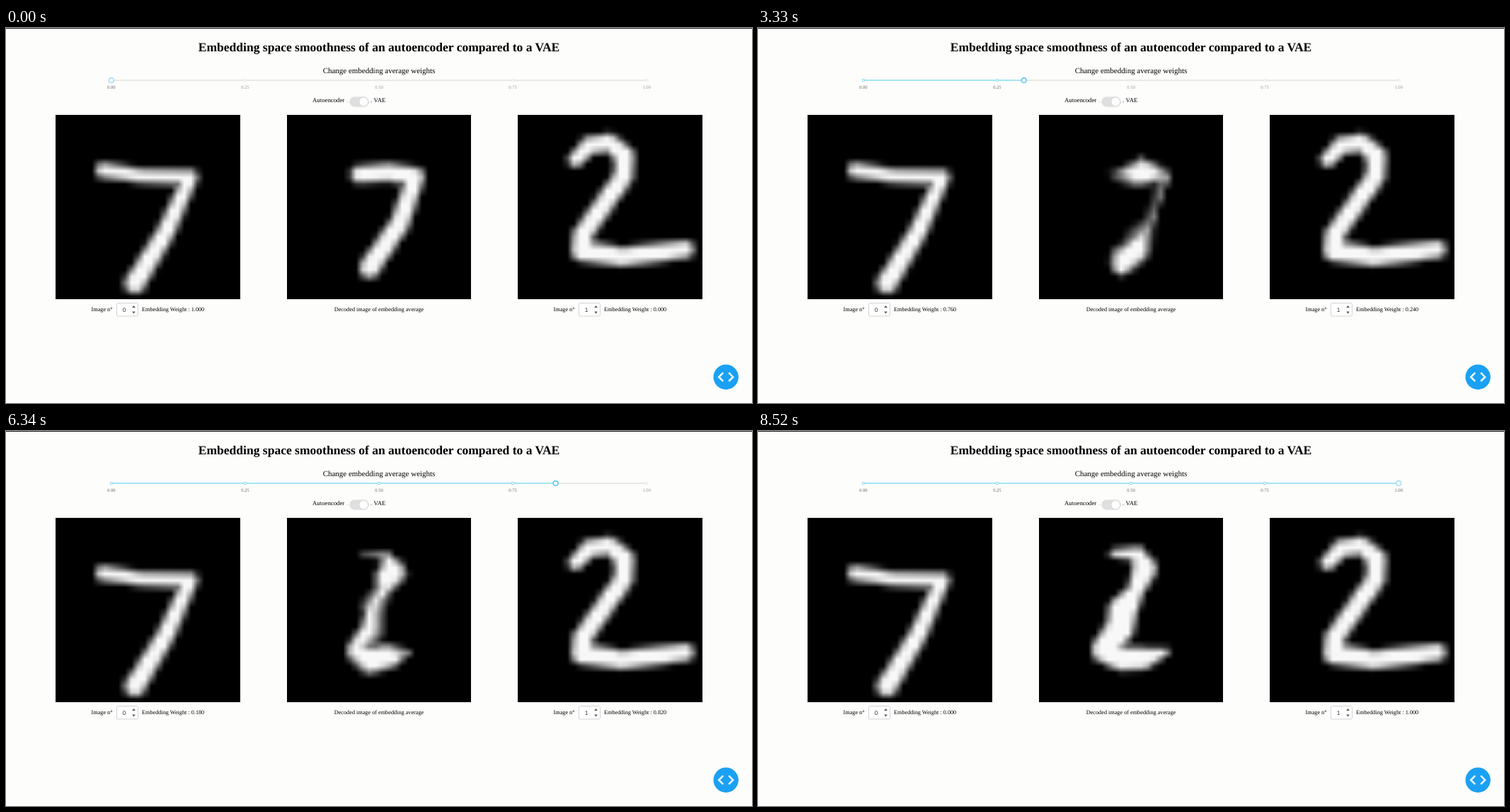
These frames come from a looping animation (1054 by 531 pixels, 8610 ms). An HTML page with a canvas:

```html
<!DOCTYPE html>
<html lang="en">
<head>
<meta charset="utf-8">
<title>Embedding space smoothness</title>
<style>
html, body { margin: 0; width: 100%; height: 100%; overflow: hidden; background: #fdfdfc; }
svg { position: absolute; left: 0; top: 0; }
canvas { position: absolute; top: 123px; height: 261px; background: #000; }
text { font-family: "Liberation Serif", "Times New Roman", serif; font-size: 8.22px; fill: #000; text-rendering: geometricPrecision; }
.mid { text-anchor: middle; }
.num { font: 8.4px "Liberation Sans", Arial, sans-serif; fill: #333; }
.mark { font-size: 6.6px; text-anchor: middle; }
.big { font-size: 8.77px; }
</style>
</head>
<body>
<svg width="1054" height="531" viewBox="0 0 1054 531">
  <rect width="1054" height="1" fill="#222"/>
  <text class="mid" x="527" y="32.8" style="font-size:17.55px;font-weight:bold">Embedding space smoothness of an autoencoder compared to a VAE</text>
  <text class="mid" x="527" y="64.4" style="font-size:10.98px">Change embedding average weights</text>

  <rect x="148.8" y="72.9" width="756.4" height="2.2" rx="1.1" fill="#e9e9e4"/>
  <rect id="track" x="148.8" y="72.9" height="2.2" rx="1.1" fill="#a4e5f4"/>
  <g id="marks"></g>
  <circle id="handle" cy="74" r="3.4" fill="#fff"/>

  <text class="big" x="433" y="104.8">Autoencoder</text>
  <text class="big" x="519.5" y="104.8">VAE</text>
  <circle cx="482.5" cy="104.5" r="1" fill="#e2e2e2"/>
  <circle cx="516" cy="104.5" r="1.2" fill="#b4dcf2"/>
  <rect x="485.3" y="97.3" width="27.6" height="14.4" rx="7.2" fill="#dfdfdf"/>
  <circle cx="505.3" cy="104.5" r="6.4" fill="#fff" stroke="#cfcfcf" stroke-width=".7"/>

  <g id="left"></g>
  <g id="right"></g>
  <text class="mid" x="527" y="400.6">Decoded image of embedding average</text>

  <circle cx="1017.2" cy="494.2" r="17.7" fill="#1aa1f3"/>
  <path d="M1013.2 488.2l-6 6 6 6M1021.2 488.2l6 6-6 6" fill="none" stroke="#fff" stroke-width="2.4"/>
</svg>
<script>
const LOOP = 8610, N = 28, SIZE = 261, SOFT = 11;
const X0 = 148.8, SPAN = 756.4;
const $ = id => document.getElementById(id);

// Each stroke is a chain of [x, y, radius] in panel pixels.
const seven = [[67, 78, 10], [120, 86, 9], [190, 88, 10], [156, 165, 12], [112, 238, 14]];
const two = [[82, 63, 10], [101, 43, 12], [129, 39, 12], [151, 58, 13], [149, 87, 13],
  [91, 170, 13], [90, 192, 14], [147, 201, 13], [236, 190, 12]];

// The decoder's own versions; everything between them is a blend.
const softSeven = [[102, 84, 11], [143, 81, 12], [182, 87, 12], [160, 153, 13], [117, 216, 14]];
const softTwo = [[106, 50, 5], [140, 50, 9], [149, 72, 17], [138, 102, 11], [119, 130, 20],
  [115, 155, 19], [93, 186, 18], [115, 199, 16], [147, 199, 15], [178, 190, 5]];

// Slider position over time.
const drag = [[1630, 0], [2280, .1], [3330, .3], [4630, .53], [5590, .68], [7090, .98], [7460, 1]];

function position(t) {
  const i = drag.findIndex(p => p[0] >= t);
  if (i < 0) return 1;
  if (!i) return 0;
  const [a, u] = drag[i - 1], [b, v] = drag[i];
  return u + (v - u) * (t - a) / (b - a);
}

const step = v => Math.round(v * 100) / 100;

// The decoder trails the slider, most of all around a third of the way.
function weight(t) {
  const p = position(t - 50);
  return step(Math.max(0, p - .05 * Math.exp(-(((p - .3) / .25) ** 2))));
}

// How deep a point lies inside a tapered segment.
function depth(x, y, [ax, ay, ar], [bx, by, br]) {
  const dx = bx - ax, dy = by - ay;
  const k = Math.max(0, Math.min(1, ((x - ax) * dx + (y - ay) * dy) / (dx * dx + dy * dy)));
  return ar + (br - ar) * k - Math.hypot(x - ax - dx * k, y - ay - dy * k);
}

function field(stroke) {
  const cell = SIZE / N;
  return Float32Array.from({ length: N * N }, (_, i) => {
    const x = (i % N + .5) * cell, y = (Math.floor(i / N) + .5) * cell;
    return Math.max(...stroke.slice(1).map((p, j) => depth(x, y, stroke[j], p)));
  });
}

function panel(left, width) {
  const c = document.createElement('canvas');
  c.width = c.height = N;
  c.style.left = left + 'px';
  c.style.width = width + 'px';
  document.body.append(c);
  return c.getContext('2d');
}

function paint(ctx, f, g = f, k = 0) {
  const img = ctx.createImageData(N, N);
  for (let i = 0; i < N * N; i++) {
    const d = f[i] + (g[i] - f[i]) * k;
    const v = 248 * Math.max(0, Math.min(1, .5 + d / SOFT));
    img.data.set([v, v, v, 255], i * 4);
  }
  ctx.putImageData(img, 0, 0);
}

function caption(id, x, n) {
  $(id).innerHTML = `<text x="${x + .5}" y="401">Image n°</text>
    <rect x="${x + 36.4}" y="389.6" width="30" height="18.4" rx="2" fill="#fff" stroke="#ccc" stroke-width=".9"/>
    <text class="num mid" x="${x + 47.2}" y="402">${n}</text>
    <path d="M${x + 58.2} 396h4.6l-2.3-3zM${x + 58.2} 401.6h4.6l-2.3 3z" fill="#555"/>
    <text x="${x + 72}" y="401">Embedding Weight : <tspan></tspan></text>`;
  return $(id).querySelector('tspan');
}

const stops = [0, .25, .5, .75, 1];
$('marks').innerHTML = stops.map(s => {
  const x = X0 + SPAN * s;
  return `<circle cx="${x}" cy="74" r="1.7" fill="#fff" stroke-width="1.1"/>
    <text class="mark" x="${x}" y="86.2">${s.toFixed(2)}</text>`;
}).join('');
const dots = $('marks').querySelectorAll('circle'), marks = $('marks').querySelectorAll('text');

const leftText = caption('left', 120, 0), rightText = caption('right', 773, 1);
paint(panel(70, SIZE), field(seven));
paint(panel(723, SIZE), field(two));
const decoded = panel(397, SIZE - 1);
const from = field(softSeven), to = field(softTwo);

function render(t) {
  const pos = step(position(t)), w = weight(t);
  const held = t >= 1020 && t < 7720;
  $('track').setAttribute('width', SPAN * pos);
  const h = $('handle');
  h.setAttribute('cx', X0 + SPAN * pos);
  h.setAttribute('stroke', held ? '#62cbeb' : '#92d9f1');
  h.setAttribute('stroke-width', held ? 1.7 : 1.2);
  stops.forEach((s, i) => {
    dots[i].setAttribute('stroke', s <= pos ? '#92d9f1' : '#e8e8e3');
    marks[i].style.fill = s <= pos ? '#666' : '#999';
  });
  leftText.textContent = (1 - w).toFixed(3);
  rightText.textContent = w.toFixed(3);
  // The blend lingers around its middle.
  paint(decoded, from, to, w + .08 * Math.sin(2 * Math.PI * w));
}

const start = performance.now();
function tick() {
  render((performance.now() - start) % LOOP);
  requestAnimationFrame(tick);
}
tick();
</script>
</body>
</html>
```
